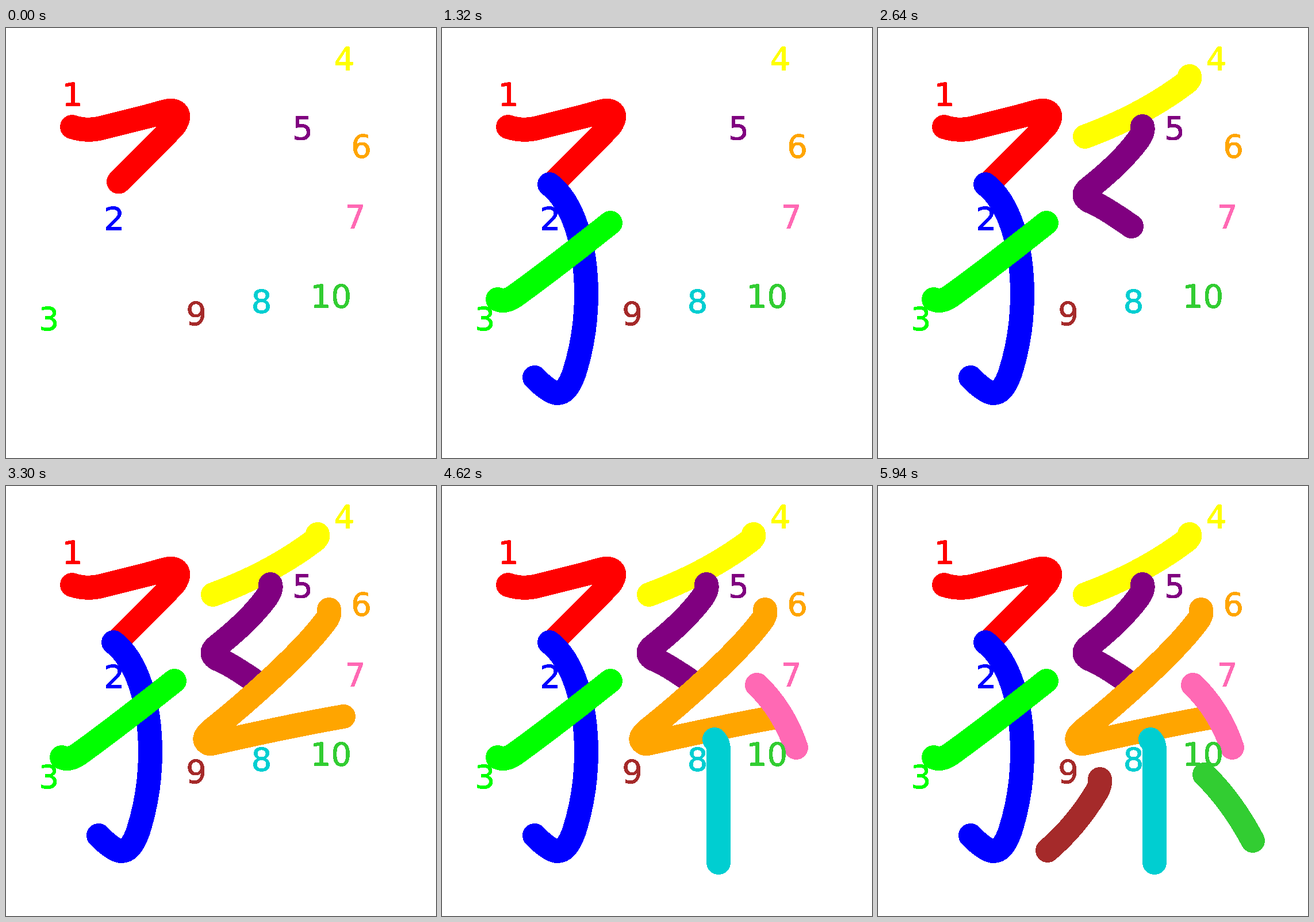
Write an HTML page that moves like this. It is 748x748 px and loops after 6600 ms.

```html
<!DOCTYPE html>
<html lang="en">
<head>
<meta charset="utf-8">
<title>Stroke order</title>
<style>
  @property --step { syntax: "<number>"; inherits: true; initial-value: 1; }
  html, body { margin: 0; height: 100%; overflow: hidden; background: #fff; }
  svg { display: block; width: 100%; height: 100%; animation: draw 6600ms steps(10, end) infinite; }
  path {
    fill: none;
    stroke-width: 42;
    stroke-linecap: round;
    stroke-linejoin: round;
    shape-rendering: crispEdges;
    opacity: clamp(0, var(--step) - var(--order) + 1, 1);
  }
  text { font: 56px "DejaVu Sans", Verdana, sans-serif; text-anchor: middle; stroke-width: 1; }
  @keyframes draw { from { --step: 1; } to { --step: 11; } }
</style>
</head>
<body>
<svg viewBox="0 0 748 748">
  <filter id="crisp" color-interpolation-filters="sRGB" filterUnits="userSpaceOnUse" x="0" y="0" width="748" height="748">
    <feComponentTransfer><feFuncA type="discrete" tableValues="0 1"/></feComponentTransfer>
  </filter>
  <g id="strokes"></g>
  <g id="labels" filter="url(#crisp)"></g>
</svg>
<script>
  // colour, label centre x, label baseline, brush path
  const strokes = [
    ["red", 115.5, 135, "M115 172Q141 181 170 173L257 151Q276 145 284 144Q301 143 299 157Q297 165 291 172Q276 188 196 267.5"],
    ["blue", 188.2, 351, "M187 272C229 304 251 380 251 463C251 510 244 556 230 600Q218 635 201 635Q187 635 161 608"],
    ["lime", 74.5, 525, "M97 472Q110 478 127 466C180 428 245 377 293 339"],
    ["yellow", 588.5, 72.5, "M542 84Q544 89 535 96C490 130 430 163 360 189"],
    ["purple", 516, 194, "M460 171Q463 180 453 194C428 228 397 255 368 278Q351 291 368 301Q388 308 441 345"],
    ["orange", 618, 224.5, "M562 215Q564 225 556 235C515 290 420 375 357 425Q338 441 353 448Q356 449 367 446Q500 416 587 401"],
    ["hotpink", 607.5, 347.5, "M548 346Q594 390 616 455"],
    ["darkturquoise", 444.5, 494.5, "M474 441Q481 448 481 459V655"],
    ["brown", 331, 515.5, "M386 510Q387 521 381 531Q346 590 295 634"],
    ["limegreen", 565.5, 485.5, "M568 502Q616 549 652 617"],
  ];

  function add(parent, tag, attributes, content = "") {
    const node = document.createElementNS(parent.namespaceURI, tag);
    for (const name in attributes) node.setAttribute(name, attributes[name]);
    node.textContent = content;
    parent.append(node);
  }

  const strokeLayer = document.getElementById("strokes");
  const labelLayer = document.getElementById("labels");
  strokes.forEach(([color, x, y, d], i) => {
    add(strokeLayer, "path", { d, stroke: color, style: `--order:${i + 1}` });
    add(labelLayer, "text", { x, y, fill: color, stroke: color }, i + 1);
  });
</script>
</body>
</html>
```
